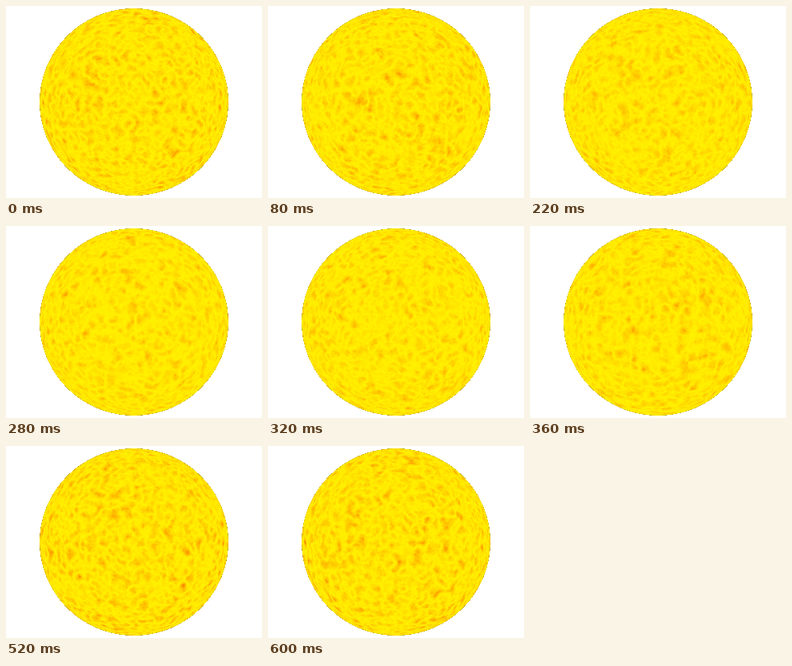
Recreate the animation shown at these times as an HTML page with a canvas. Size 320 by 240 pixels, loop 620 ms.

```html
<!DOCTYPE html>
<html lang="en">
<head>
<meta charset="utf-8">
<title>Sun</title>
<style>
  html, body { margin: 0; width: 100%; height: 100%; overflow: hidden; background: #fff; }
  canvas { display: block; width: 320px; height: 240px; }
</style>
</head>
<body>
<canvas id="stage" width="320" height="240"></canvas>
<script>
const W = 320, H = 240, STEP = 20, STEPS = 31;
const CX = 160, CY = 120, RX = 118, RY = 117;
const ctx = document.getElementById('stage').getContext('2d');

// Seeded permutation table
let seed = 4127;
const random = () => (seed = (seed * 1664525 + 1013904223) >>> 0) / 4294967296;
const perm = new Uint8Array(512);
for (let i = 0; i < 256; i++) perm[i] = i;
for (let i = 255; i > 0; i--) {
  const j = Math.floor(random() * (i + 1));
  [perm[i], perm[j]] = [perm[j], perm[i]];
}
for (let i = 0; i < 256; i++) perm[i + 256] = perm[i];

// 32 gradients: one axis is zero, the other three are +1 or -1
const grad = new Float32Array(128);
for (let h = 0; h < 32; h++) {
  let bits = h & 7;
  for (let axis = 0; axis < 4; axis++) {
    if (axis === h >> 3) continue;
    grad[h * 4 + axis] = bits & 1 ? 1 : -1;
    bits >>= 1;
  }
}

const fade = t => t * t * t * (t * (t * 6 - 15) + 10);

// 4D gradient noise, periodic along w
function noise(x, y, z, w, period) {
  const X = Math.floor(x), Y = Math.floor(y), Z = Math.floor(z), T = Math.floor(w);
  x -= X; y -= Y; z -= Z; w -= T;
  const u = fade(x), v = fade(y), s = fade(z), r = fade(w);
  let sum = 0;
  for (let d = 0; d < 2; d++) {
    const pd = perm[(T + d) % period], wd = d ? r : 1 - r;
    for (let c = 0; c < 2; c++) {
      const pc = perm[pd + (Z + c & 255)], wc = wd * (c ? s : 1 - s);
      for (let b = 0; b < 2; b++) {
        const pb = perm[pc + (Y + b & 255)], wb = wc * (b ? v : 1 - v);
        for (let a = 0; a < 2; a++) {
          const g = (perm[pb + (X + a & 255)] & 31) << 2;
          sum += wb * (a ? u : 1 - u) * (grad[g] * (x - a) + grad[g + 1] * (y - b) +
            grad[g + 2] * (z - c) + grad[g + 3] * (w - d));
        }
      }
    }
  }
  return sum;
}

function turbulence(x, y, z, phase) {
  let sum = 0;
  for (let k = 0; k < 3; k++) {
    const scale = 10 * 2 ** k, period = 6 + 2 * k, shift = 40.3 + 17 * k;
    sum += Math.abs(noise(x * scale + shift, y * scale + shift, z * scale + shift,
      phase * period, period)) / 2 ** k;
  }
  return sum;
}

function render(phase) {
  const img = ctx.createImageData(W, H), px = img.data.fill(255);
  // The surface glows a little deeper around the loop point
  const depth = 62 + 8 * Math.cos(2 * Math.PI * (phase + 0.1));
  for (let j = 0; j < H; j++) {
    for (let i = 0; i < W; i++) {
      const x = (i + 0.5 - CX) / RX, y = (j + 0.5 - CY) / RY, d = Math.hypot(x, y);
      const cover = Math.min(1, (1 - d) * RX + 0.5);
      if (cover < 0.5) continue;
      const z = Math.sqrt(Math.max(0, 1 - d * d));
      const heat = turbulence(x, y, z, phase);
      const green = Math.max(130, 242 - depth * heat ** 1.7);
      const shade = 0.4 + 0.6 * cover;
      const o = (j * W + i) * 4;
      px[o] = Math.min(255, 255 - (165 - green) * 0.3) * shade;
      px[o + 1] = green * shade;
      px[o + 2] = 0;
    }
  }
  return img;
}

const cache = [];
let shown = -1;
function draw() {
  const n = Math.floor(performance.now() / STEP) % STEPS;
  if (n !== shown) {
    cache[n] = cache[n] || render(n / STEPS);
    ctx.putImageData(cache[n], 0, 0);
    shown = n;
  }
  requestAnimationFrame(draw);
}
draw();
</script>
</body>
</html>
```
